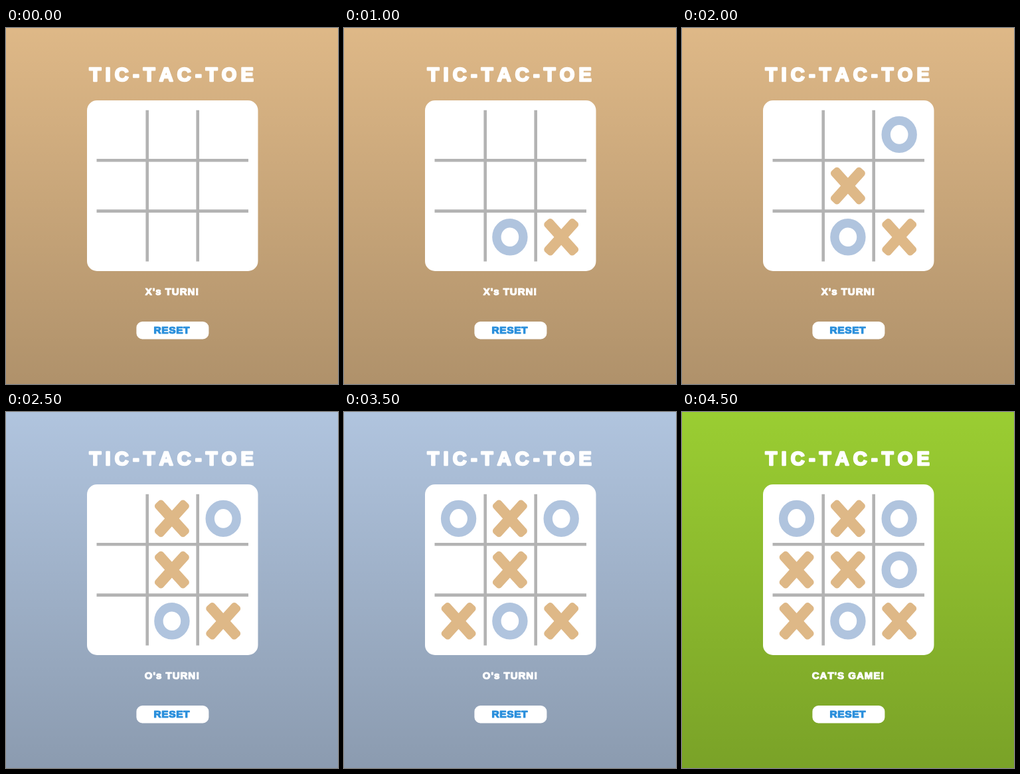
An HTML page that plays this animation: 500 px wide and 536 px high, repeating every 5 s.

```html
<!DOCTYPE html>
<html lang="en">
<head>
<meta charset="utf-8">
<title>Tic-Tac-Toe</title>
<style>
  html, body { margin: 0; width: 100%; height: 100%; overflow: hidden; }
  svg { display: block; width: 100%; height: 100%; }
  text {
    font: bold 15px "Liberation Sans", Arial, sans-serif;
    font-kerning: none;
    letter-spacing: 1px;
    fill: #fff;
    stroke: #fff;
    stroke-width: 1.2px;
    stroke-linejoin: round;
  }
  #title { font-size: 29px; letter-spacing: 6.2px; stroke-width: 2.4px; }
  #reset { font-size: 15.5px; letter-spacing: .6px; fill: #2a8fdc; stroke: #2a8fdc; }
</style>
</head>
<body>
<svg viewBox="0 0 500 536">
  <defs>
    <linearGradient id="shade" x2="0" y2="1">
      <stop stop-opacity="0"/>
      <stop offset="1" stop-opacity=".21"/>
    </linearGradient>
    <g id="X" fill="#deb887">
      <rect x="-33" y="-8" width="66" height="16" rx="5" transform="rotate(48)"/>
      <rect x="-33" y="-8" width="66" height="16" rx="5" transform="rotate(-48)"/>
    </g>
    <ellipse id="O" rx="20" ry="21" fill="none" stroke="#b0c4de" stroke-width="13.4"/>
  </defs>
  <rect id="backdrop" width="500" height="536"/>
  <rect width="500" height="536" fill="url(#shade)"/>
  <text id="title" x="125.6" y="80">TIC-TAC-TOE</text>
  <rect x="122" y="109" width="257.5" height="257" rx="15" fill="#fff"/>
  <path d="M212.7 123.7V351.5M288.7 123.7V351.5M136.5 199.3H365M136.5 275.6H365"
        stroke="#b3b3b3" stroke-width="4.6"/>
  <g id="marks"></g>
  <text id="status" x="250.5" y="402" text-anchor="middle"></text>
  <rect x="196.4" y="442" width="109" height="26.5" rx="9" fill="#fff"/>
  <text id="reset" x="222.5" y="460.4">RESET</text>
</svg>
<script>
  const STEP_MS = 500;
  const moves = [8, 7, 4, 2, 1, 0, 6, 5, 3]; // cells in playing order, X first
  const colors = { X: '#deb887', O: '#b0c4de', draw: '#9acd32' };
  const player = turn => turn % 2 ? 'O' : 'X';
  const find = id => document.getElementById(id);

  find('marks').innerHTML = moves.map((cell, turn) => {
    const x = 172.6 + 77.3 * (cell % 3);
    const y = 160.4 + 77.2 * Math.floor(cell / 3);
    return `<use href="#${player(turn)}" x="${x}" y="${y}"/>`;
  }).join('');
  const marks = [...find('marks').children];

  function show(turn) {
    const over = turn === moves.length;
    marks.forEach((mark, i) => mark.setAttribute('visibility', i < turn ? 'visible' : 'hidden'));
    find('backdrop').setAttribute('fill', colors[over ? 'draw' : player(turn)]);
    find('status').textContent = over ? "CAT'S GAME!" : `${player(turn)}'s TURN!`;
  }

  let shown = -1;
  const start = performance.now();
  function tick() {
    const turn = Math.floor((performance.now() - start) / STEP_MS) % (moves.length + 1);
    if (turn !== shown) show(shown = turn);
    requestAnimationFrame(tick);
  }
  tick();
</script>
</body>
</html>
```
